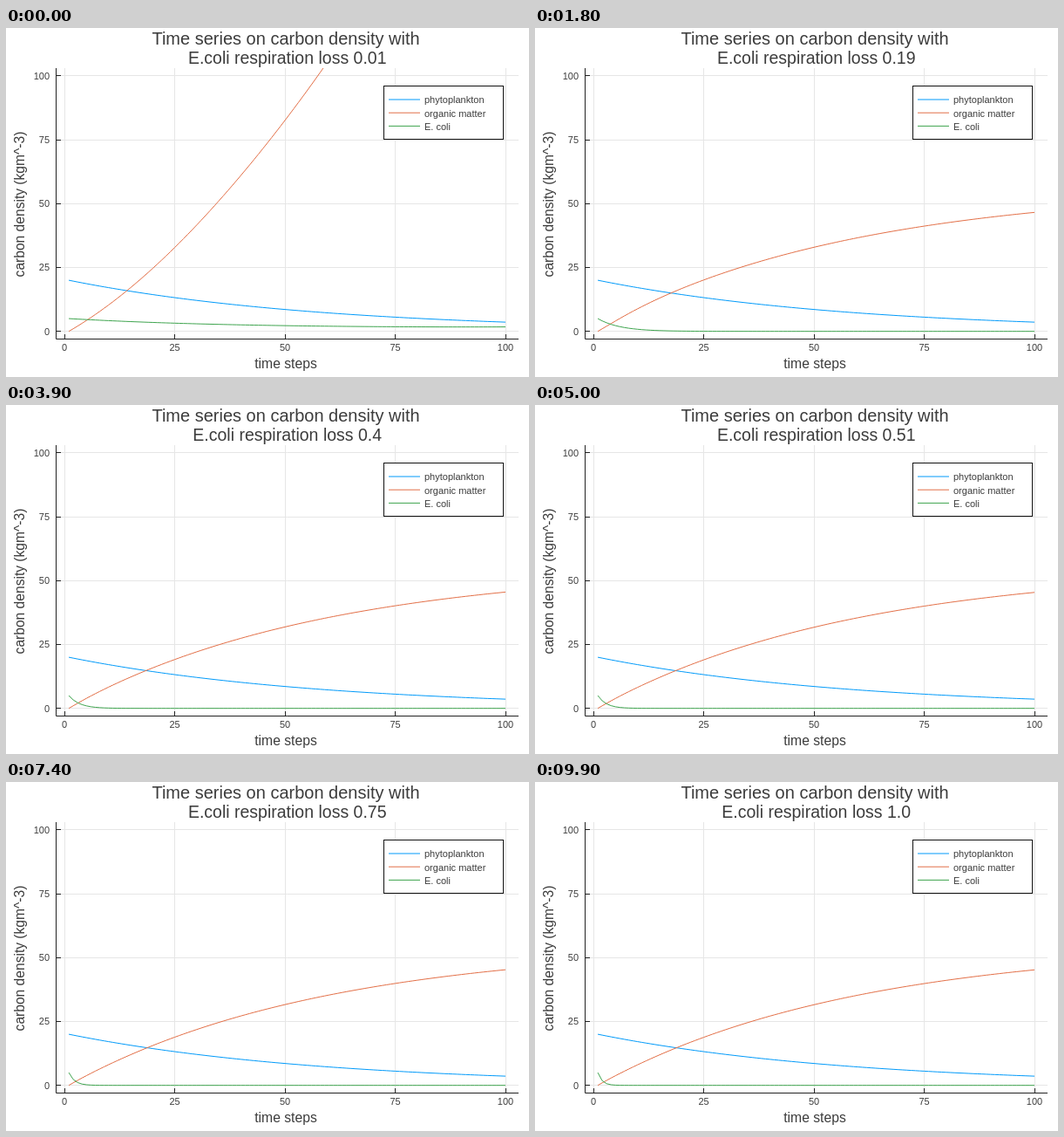
An HTML page with a canvas for the animation above (10 s loop, 600 by 400 pixels).

```html
<!DOCTYPE html>
<html lang="en">
<head>
<meta charset="utf-8">
<title>Carbon density</title>
<style>
html, body { margin: 0; width: 100%; height: 100%; overflow: hidden; background: #fff; }
canvas { display: block; }
</style>
</head>
<body>
<canvas id="stage" width="600" height="400"></canvas>
<script>
const ctx = document.getElementById('stage').getContext('2d');
const STEP_MS = 100, STEPS = 100;
const SERIES = [['phytoplankton', '#009afa'], ['organic matter', '#e36f47'], ['E. coli', '#3ea44e']];
const TICKS = [0, 25, 50, 75, 100];
const px = t => 67 + 5.06 * t;
const py = v => 347.7 - 2.929 * v;

// Rates of change of phytoplankton, organic matter and bacteria
function rates([p, o, e], loss) {
  const uptake = 0.01 * e * o;
  return [-0.0173 * p, 0.0476 * p + 0.01 * e + 0.99 * uptake, 0.01 * uptake - (0.01 + loss) * e];
}

// Runge-Kutta solution at t = 1..100
function solve(loss) {
  const sub = 4, h = 1 / sub;
  const add = (s, k, f) => s.map((v, i) => v + k[i] * f);
  let s = [20, 0, 5];
  const out = [s];
  for (let n = 1; n <= 99 * sub; n++) {
    const a = rates(s, loss);
    const b = rates(add(s, a, h / 2), loss);
    const c = rates(add(s, b, h / 2), loss);
    const d = rates(add(s, c, h), loss);
    s = s.map((v, i) => v + h / 6 * (a[i] + 2 * b[i] + 2 * c[i] + d[i]));
    if (n % sub === 0) out.push(s);
  }
  return out;
}

function path(points, color) {
  ctx.beginPath();
  points.forEach(([x, y]) => ctx.lineTo(x, y));
  ctx.strokeStyle = color;
  ctx.stroke();
}

function text(str, x, y, size, align = 'center') {
  ctx.font = `${size}px "Liberation Sans", Arial, sans-serif`;
  ctx.textAlign = align;
  ctx.fillStyle = '#3c3c3c';
  ctx.fillText(str, x, y);
}

function axes() {
  const snap = v => Math.floor(v) + 0.5;
  for (const v of TICKS) {
    const x = snap(px(v)), y = snap(py(v));
    path([[x, 46], [x, 356]], '#e6e6e6');
    path([[57, y], [588, y]], '#e6e6e6');
  }
  path([[57.5, 46], [57.5, 356.5], [588, 356.5]], '#222');
  for (const v of TICKS) {
    const x = snap(px(v)), y = snap(py(v));
    path([[x, 351], [x, 356]], '#222');
    path([[57, y], [63, y]], '#222');
    text(v, px(v), 370, 11);
    text(v, 50, py(v) + 4, 11, 'right');
  }
  text('time steps', 321, 390, 15.7);
  ctx.save();
  ctx.translate(21, 202);
  ctx.rotate(-Math.PI / 2);
  text('carbon density (kgm^-3)', 0, 0, 15.6);
  ctx.restore();
}

function legend() {
  ctx.fillStyle = '#fff';
  ctx.fillRect(433, 66, 137, 61);
  ctx.strokeStyle = '#111';
  ctx.strokeRect(433.5, 66.5, 137, 61);
  SERIES.forEach(([name, color], i) => {
    const y = 82 + 15.2 * i;
    path([[439, y], [475, y]], color);
    text(name, 480, y + 4.3, 11, 'left');
  });
}

function draw(step) {
  const loss = (step + 1) / STEPS;
  ctx.fillStyle = '#fff';
  ctx.fillRect(0, 0, 600, 400);
  ctx.lineWidth = 1;
  axes();
  const data = solve(loss);
  ctx.save();
  ctx.beginPath();
  ctx.rect(57, 46, 531, 311);
  ctx.clip();
  SERIES.forEach(([, color], k) => path(data.map((s, i) => [px(i + 1), py(s[k])]), color));
  ctx.restore();
  legend();
  text('Time series on carbon density with', 321, 19, 20);
  text('E.coli respiration loss ' + (loss === 1 ? '1.0' : loss), 322.7, 41, 19.5);
}

let shown = -1;
function tick() {
  const step = Math.floor(performance.now() / STEP_MS) % STEPS;
  if (step !== shown) draw(shown = step);
  requestAnimationFrame(tick);
}
tick();
</script>
</body>
</html>
```
